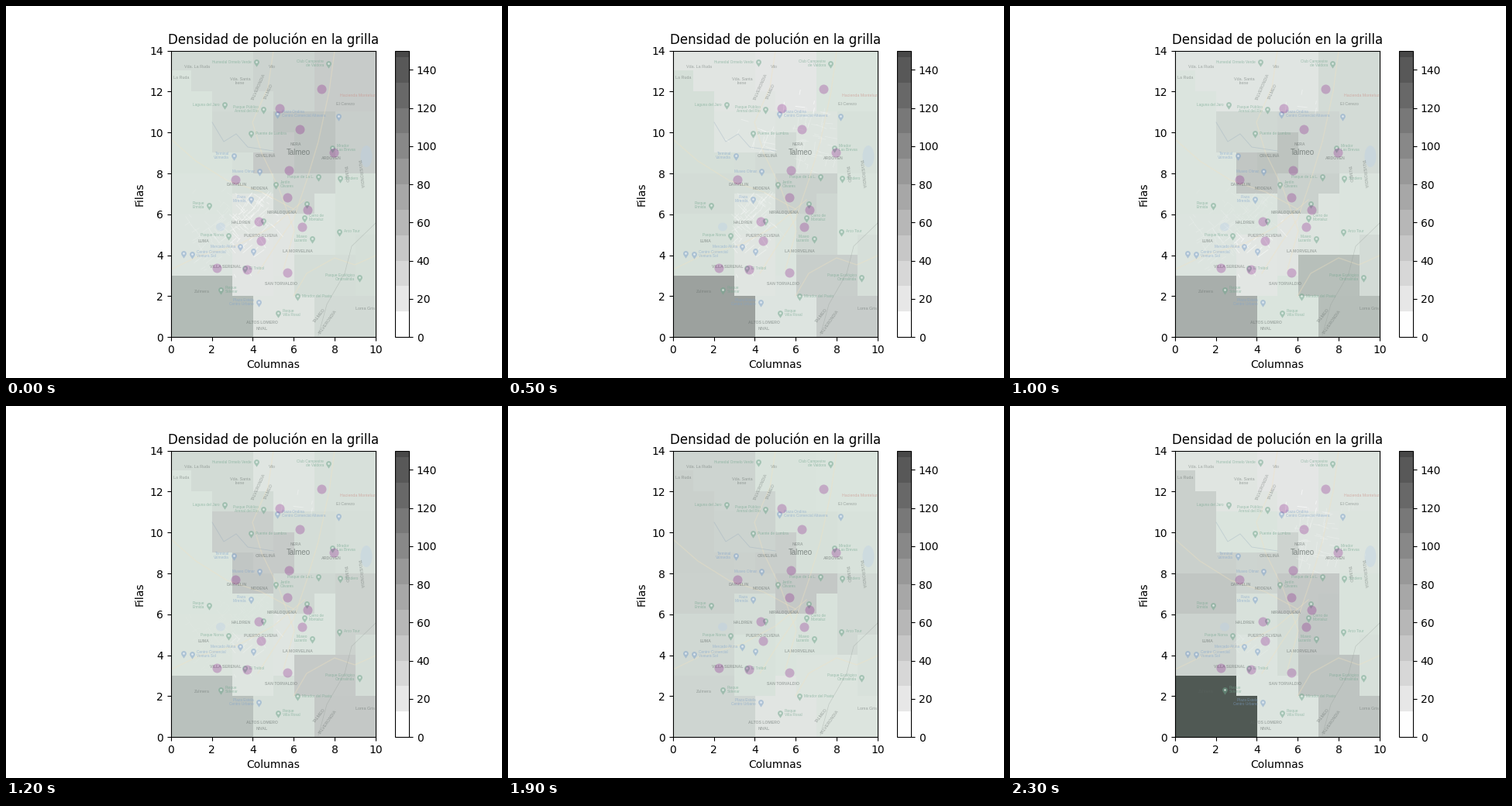
These frames come from a looping animation (640 px wide and 480 px high, 2.4 s). A matplotlib script:

```python
import random

import matplotlib.pyplot as plt
import numpy as np
from matplotlib.animation import FuncAnimation
from matplotlib.cm import ScalarMappable
from matplotlib.collections import LineCollection
from matplotlib.colors import ListedColormap, Normalize, to_rgb, to_rgba
from matplotlib.patches import Ellipse
from matplotlib.path import Path

COLS, ROWS, HOURS, CELL = 10, 14, 24, 26.4

# Each grid cell takes the level of its nearest site.
SITES = np.array([
    (1.5, 1.5), (1.5, 4.5), (1.2, 7.0), (1.1, 9.5), (3.6, 12.2), (3.8, 9.9),
    (4.2, 7.5), (4.0, 5.6), (4.0, 4.0), (5.3, 8.8), (5.7, 7.0), (5.5, 4.9),
    (7.0, 5.3), (8.8, 6.0), (9.9, 3.5), (5.6, 1.3), (7.4, 3.0), (8.5, 1.0),
    (5.3, 12.8), (6.7, 9.6), (9.0, 9.4), (8.6, 12.5)])


def southwest(strength):
    return 1.5, 1.5, 1, strength


def centre(strength):
    return 5.6, 7.75, 0.9, strength


RUSH = [centre(36), (7.8, 1.8, 1.1, 45), (7, 4.7, 1, 32)]

# Clouds of pollution by hour: x, y, spread, strength.
CLOUDS = {
    0: [southwest(37), (6.8, 11, 2.6, 32), (6, 8, 1, 18), (8, 2, 1.5, 13)],
    3: [southwest(24), centre(22), (8, 2, 1.4, 18), (0.5, 8, 2.5, 9), (9.5, 10.5, 1.8, 9)],
    7: [southwest(88), (0.5, 6, 3, 8), *RUSH],
    10: [southwest(47), (7.9, 2, 1.2, 55), (4.8, 8.2, 1.4, 38), (8, 11, 2, 12)],
    15: [(3.6, 11.2, 1.1, 46), (3.9, 8.2, 1.2, 36), (8.9, 6, 0.9, 36), (5, 0.5, 3, 18)],
    19: [southwest(9), centre(28), (1.5, 8, 4, 17), (3.5, 11.5, 1.5, 11), (9, 5.5, 1, 8)],
    23: [southwest(124), (0.5, 7.2, 2.5, 27), *RUSH],
}

STOPS = [0, 14, 24, 33, 45, 58, 72, 110, 145]
TINTS = np.array([to_rgb(c) for c in (
    "#ffffff", "#e7e7e7", "#dae4dd", "#d0d8d3", "#c5c9c7",
    "#b3bcb7", "#a5aaa7", "#727a76", "#505954")])


def site_levels(clouds):
    x, y = SITES.T
    level = 15 + 1.8 * abs(x - 5)
    for cx, cy, spread, strength in clouds:
        level += strength * np.exp(-((x - cx) ** 2 + (y - cy) ** 2) / (2 * spread ** 2))
    return level


KEYS = list(CLOUDS)
LEVELS = np.array([site_levels(c) for c in CLOUDS.values()])

row, col = np.mgrid[0:ROWS, 0:COLS] + 0.5
owner = np.argmin((col[..., None] - SITES[:, 0]) ** 2
                  + (row[..., None] - SITES[:, 1]) ** 2, axis=-1)


def density(hour):
    return np.array([np.interp(hour, KEYS, site) for site in LEVELS.T])[owner]


def shade(grid):
    return np.stack([np.interp(grid, STOPS, channel) for channel in TINTS.T], -1)


def to_grid(x, y):
    return (x - 212.8) / CELL, (427.2 - y) / CELL


fig, ax = plt.subplots(figsize=(6.4, 4.8), dpi=100)
cells = ax.imshow(shade(density(0)), origin="lower", extent=(0, COLS, 0, ROWS),
                  interpolation="nearest")

greys = [0.995, *np.linspace(231, 72, 11) / 255]
bar_map = ListedColormap([(greys[i // 4],) * 3 for i in range(45)])
fig.colorbar(ScalarMappable(Normalize(0, 150), bar_map), ax=ax)
ax.set(title="Densidad de polución en la grilla", xlabel="Columnas", ylabel="Filas")


def road(points, color="#f3e3c0", width=1.0):
    xs, ys = zip(*(to_grid(x, y) for x, y in points))
    ax.plot(xs, ys, color=color, lw=width, alpha=0.35, zorder=2)


def lake(x, y, w, h):
    ax.add_patch(Ellipse(to_grid(x, y), w / CELL, h / CELL, color="#b9cfe8",
                         alpha=0.35, lw=0, zorder=1.5))


lake(465, 194, 15, 28)
lake(277, 285, 12, 11)
road([(424, 58), (417, 110), (403, 175), (388, 225), (371, 275), (349, 307), (325, 345)])
road([(345, 58), (338, 105), (318, 150), (330, 190), (352, 235), (372, 290), (358, 340)])
road([(213, 172), (245, 200), (285, 225), (330, 240), (371, 262)])
road([(213, 340), (250, 322), (300, 308), (345, 284), (385, 250)])
road([(371, 374), (388, 345), (424, 325), (450, 334), (477, 322)])
road([(403, 425), (414, 385), (437, 345), (446, 310), (477, 280)], "#8d9691", 0.5)
road([(266, 150), (281, 175), (297, 165), (312, 182), (345, 187)], "#8ea5bb", 0.6)

# Streets gather along the city's spine and turn with it.
rng = random.Random(4)
segments, spots = [], []
for k in range(330):
    t = rng.random()
    x = 2.2 + 4.6 * t + rng.gauss(0, 0.9)
    y = 4.2 + 6.6 * t + rng.gauss(0, 0.8)
    turn = np.radians(30 + 55 * t + 90 * (k % 2))
    half = rng.uniform(0.08, 0.32)
    dx, dy = half * np.cos(turn), half * np.sin(turn)
    segments.append([(x - dx, y - dy), (x + dx, y + dy)])
    spots.append((int(np.clip(y, 0, ROWS - 1)), int(np.clip(x, 0, COLS - 1))))
net = LineCollection(segments, linewidths=0.7, zorder=2.2)
ax.add_collection(net)
spot_rows, spot_cols = np.array(spots).T


def street_colors(grid):
    """Streets show white only where the air is clean."""
    colors = np.tile(to_rgba("white"), (len(segments), 1))
    colors[:, 3] = 0.65 * np.clip((24 - grid[spot_rows, spot_cols]) / 8, 0, 1)
    return colors


theta = np.radians(np.linspace(-30, 210, 15))
arc = np.column_stack([np.cos(theta), np.sin(theta)])
pin_shape = Path(np.vstack([arc, [[0, -1.8]], arc[:1]]))
GREEN, BLUE, GREY = "#6fa58c", "#7fa3cc", "#5d6663"


def label(x, y, text, size=3.9, color=GREY, alpha=0.5, **kw):
    style = dict(ha="center", va="center", family="Liberation Sans", zorder=3,
                 linespacing=1.0, clip_on=True)
    ax.text(*to_grid(x, y), text, size=size, color=color, alpha=alpha, **{**style, **kw})


def pin(x, y, text="", color=GREEN, side=1):
    spot = to_grid(x, y)
    ax.scatter(*spot, s=80, marker=pin_shape, color=color, alpha=0.5, lw=0, zorder=3)
    ax.scatter(*spot, s=4, color="white", alpha=0.6, lw=0, zorder=3.1)
    if text:
        label(x + 6 * side, y, text, 3.4, color, 0.6, ha="left" if side > 0 else "right")


pin(323, 72, "Humedal Ormelo Verde", side=-1)
pin(416, 74, "Club Campestre\nde Valdora", side=-1)
pin(282, 127, "Laguna del Jaro", side=-1)
pin(332, 133, "Parque Público\nArenal del Río", side=-1)
pin(350, 139, "Plaza Ondina\nCentro Comercial Altavera", BLUE)
pin(429, 142, "", BLUE)
pin(316, 164, "Puente de Lumbra")
pin(294, 193, "Terminal\nValmedia", BLUE, -1)
pin(327, 213, "Museo Olmar", BLUE, -1)
pin(421, 183, "Mirador\nLas Brevas")
pin(403, 220, "Parque de La L.", side=-1)
pin(431, 222, "Sendero")
pin(348, 230, "Jardín\nOlivares")
pin(316, 249, "Plaza\nMirenda", BLUE, -1)
pin(388, 255)
pin(385, 273, "Cerro de\nMontaluz")
pin(262, 257, "Parque\nErmida", side=-1)
pin(332, 277)
pin(430, 291, "Arco Tour")
pin(287, 296, "Parque Norva", side=-1)
pin(395, 300, "Museo\nLuzardo", side=-1)
pin(302, 310, "Mercado Aluna", BLUE, -1)
pin(319, 316, "", BLUE)
pin(229, 319, "", BLUE)
pin(240, 320, "Centro Comercial\nVentura Sol", BLUE)
pin(456, 350, "Parque Ecológico\nOmbralinda", side=-1)
pin(277, 366, "Parque\nSolenar")
pin(308, 338, "El Trébol")
pin(376, 374, "Mirador del Pasto")
pin(326, 382, "Plaza Estela\nCentro Urbano", BLUE, -1)
pin(351, 396, "Parque\nVilla Rosal")

for x, y, text in [
        (335, 193, "ORVELINÁ"), (303, 279, "HALDREN"), (356, 266, "MIRALOQUENA"),
        (329, 296, "PUERTO OLVENA"), (376, 317, "LA MORVELINA"),
        (355, 359, "SAN TORVALDIO"), (298, 230, "DARVELIN"), (255, 303, "LUMA"),
        (374, 178, "NERA"), (420, 197, "ARDOVEN"), (327, 235, "MODENA"),
        (283, 336, "VILLA SERENAL"), (330, 416, "NIVAL"), (330, 408, "ALTOS LOMERO")]:
    label(x, y, text, 3.7, weight="bold", alpha=0.45)

for x, y, text in [
        (343, 78, "Vilo"), (246, 78, "Vda. La Ruda"), (226, 93, "La Ruda"),
        (302, 97, "Vda. Santa\nIrene"), (253, 369, "Zulmera"),
        (438, 126, "El Cerezo"), (463, 390, "Loma Gris")]:
    label(x, y, text)
label(454, 115, "Hacienda Monteluz", 3.8, "#cc8f86", 0.6)
label(377, 189, "Talmeo", 7.0, alpha=0.7)

for x, y, angle in [(326, 104, 66), (457, 216, -84), (415, 408, 55)]:
    label(x, y, "TALVERONDIA", rotation=angle)
for x, y, angle in [(339, 110, 66), (439, 217, -84), (404, 399, 52)]:
    label(x, y, "TALMEO", rotation=angle)

stations = [(7.37, 12.13), (5.30, 11.18), (6.31, 10.16), (7.98, 9.02), (5.77, 8.17),
            (3.16, 7.68), (5.70, 6.81), (6.66, 6.22), (4.28, 5.67), (6.41, 5.40),
            (4.40, 4.70), (2.23, 3.37), (3.71, 3.31), (5.70, 3.15)]
ax.scatter(*zip(*stations), s=75, color="purple", alpha=0.25, lw=0, zorder=4)
ax.set_xlim(0, COLS)
ax.set_ylim(0, ROWS)


def update(hour):
    grid = density(hour)
    cells.set_data(shade(grid))
    net.set_color(street_colors(grid))
    return cells, net


anim = FuncAnimation(fig, update, frames=HOURS, interval=100, repeat=True,
                     repeat_delay=0, blit=False)
plt.show()
```
